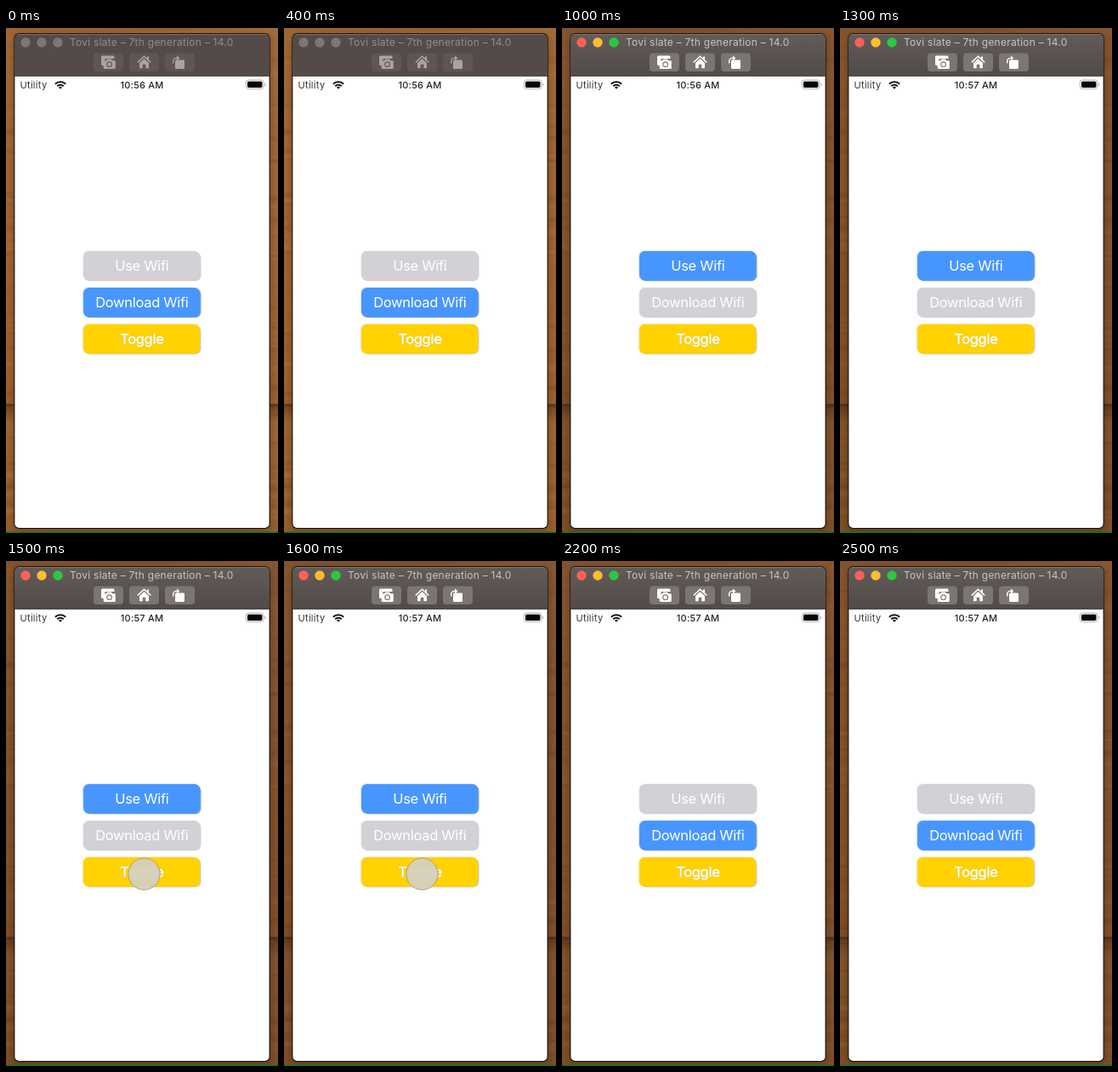
Recreate the animation shown at these times as an HTML page. Size 320 px wide and 593 px high, loop 2600 ms.

```html
<!DOCTYPE html>
<html lang="en">
<head>
<meta charset="utf-8">
<title>Toggle demo</title>
<style>
html, body { margin: 0; width: 100%; height: 100%; overflow: hidden; background: #805433; }
svg { display: block; width: 100%; height: 100%; }
text { font-family: Inter, "Liberation Sans", sans-serif; }
.label { font-size: 16.5px; letter-spacing: -0.3px; fill: #fff; text-anchor: middle; paint-order: stroke; }
.status { font-size: 11px; fill: #333; }
</style>
</head>
<body>
<svg viewBox="0 0 320 593" preserveAspectRatio="none">
  <defs>
    <linearGradient id="wood" x1="0" y1="0" x2="0" y2="1">
      <stop offset="0" stop-color="#a86c3a"/>
      <stop offset=".3" stop-color="#a96a36"/>
      <stop offset=".72" stop-color="#a4642f"/>
      <stop offset=".77" stop-color="#a66934"/>
      <stop offset="1" stop-color="#9d612f"/>
    </linearGradient>
    <linearGradient id="seam" x1="0" y1="0" x2="0" y2="1">
      <stop offset="0" stop-color="#3d2210" stop-opacity=".75"/>
      <stop offset=".2" stop-color="#4a2a14" stop-opacity=".4"/>
      <stop offset="1" stop-color="#4a2a14" stop-opacity="0"/>
    </linearGradient>
    <linearGradient id="bar" x1="0" y1="0" x2="0" y2="1">
      <stop offset="0" stop-color="#625c59"/>
      <stop offset="1" stop-color="#514a48"/>
    </linearGradient>
    <filter id="blur" x="-20%" y="-20%" width="140%" height="140%"><feGaussianBlur stdDeviation="5"/></filter>
  </defs>

  <rect width="320" height="593" fill="url(#wood)"/>
  <g id="grain" fill="none"/>
  <rect y="441.5" width="320" height="22" fill="url(#seam)"/>
  <rect id="shade" width="320" height="593" fill="#2a1c16"/>
  <rect x="9" y="10" width="302" height="580" rx="6" filter="url(#blur)" opacity=".3"/>
  <rect y="591.3" width="320" height="1.7" fill="#1a7512"/>

  <rect x="9.3" y="6" width="301.4" height="582" rx="6" fill="#17120f"/>
  <path d="M10 57V12a5 5 0 0 1 5-5H305a5 5 0 0 1 5 5V57Z" id="titlebar"/>
  <path d="M14 7.5H306" stroke="#8a817c" stroke-width=".8"/>
  <path d="M10.4 57H309.6V582a5 5 0 0 1-5 5H15.4a5 5 0 0 1-5-5Z" fill="#fff"/>
  <g id="lights">
    <circle cx="23" cy="17" r="5.7"/>
    <circle cx="42" cy="17" r="5.7"/>
    <circle cx="61" cy="17" r="5.7"/>
  </g>
  <text id="title" x="75" y="21.3" font-size="12" letter-spacing=".25">Tovi slate – 7th generation – 14.0</text>

  <g id="tools">
    <rect x="103" y="29.5" width="35" height="21.5" rx="4"/>
    <rect x="145" y="29.5" width="35" height="21.5" rx="4"/>
    <rect x="187" y="29.5" width="35" height="21.5" rx="4"/>
  </g>
  <g id="icons">
    <path d="M112 34a1.5 1.5 0 0 1 1.5-1.5H126a1.5 1.5 0 0 1 1.5 1.5V36H117.5L115.5 38V44H113.5a1.5 1.5 0 0 1-1.5-1.5Z"/>
    <path fill-rule="evenodd" d="M114.7 39.5a1.3 1.3 0 0 1 1.3-1.3H118l1.4-1.8h4.4l1.4 1.8h2.3a1.3 1.3 0 0 1 1.3 1.3V46.7a1.3 1.3 0 0 1-1.3 1.3H116a1.3 1.3 0 0 1-1.3-1.3ZM118.2 42.7a3.4 3.4 0 1 0 6.8 0a3.4 3.4 0 1 0-6.8 0ZM119.3 42.7a2.3 2.3 0 1 1 4.6 0a2.3 2.3 0 1 1-4.6 0Z"/>
    <path d="M162.5 32.2 154.3 39.8 155.3 40.9 162.5 34.3 169.7 40.9 170.7 39.8 168 37.2V33.5H166V35.4Z"/>
    <path d="M157 41 162.5 35.9 168 41V47.2H164.3V42.7H160.7V47.2H157Z"/>
    <rect x="199" y="37.5" width="11" height="10.5" rx="1.3"/>
    <path d="M196 41.5V39a4.2 4.2 0 0 1 4.2-4.2H201V32.2L204.4 35.4 201 38.5V36.1h-.6a3 3 0 0 0-3 3V41.5Z"/>
  </g>

  <text class="status" x="16.5" y="70.5" letter-spacing=".3">Utility</text>
  <g fill="none" stroke="#161616" stroke-width="2">
    <path d="M57.8 65.8A9 9 0 0 1 70.2 65.8"/>
    <path d="M60.2 68.3A5.4 5.4 0 0 1 67.8 68.3"/>
  </g>
  <path d="M64 71.8 61.9 69.7A3 3 0 0 1 66.1 69.7Z" fill="#161616"/>
  <text id="clock" class="status" x="160" y="70.5" text-anchor="middle" font-weight="500" letter-spacing=".2" style="fill:#222"></text>
  <rect x="282.3" y="61" width="20.8" height="10.6" rx="3" fill="#eee" stroke="#bbb"/>
  <rect x="284" y="62.7" width="17.4" height="7.2" rx="1.6" fill="#050505"/>
  <path d="M304.3 64.4a2 2 0 0 1 0 3.8Z" fill="#bbb"/>

  <g id="buttons"></g>
  <circle id="touch" cx="162.5" cy="367.5" r="18.6" fill="#d5d0c0" fill-opacity=".93" stroke="#aaa07d" stroke-width="1"/>
</svg>
<script>
const LOOP = 2600, ACTIVE_AT = 1000, MINUTE_AT = 1200;
const PRESS_AT = 1400, RELEASE_AT = 1700;
const GRAY = '#d3d1d5', BLUE = '#4796fe', YELLOW = '#ffd200';
const $ = id => document.getElementById(id);

function add(parent, tag, attrs, text) {
  const el = document.createElementNS('http://www.w3.org/2000/svg', tag);
  for (const key in attrs) el.setAttribute(key, attrs[key]);
  if (text) el.textContent = text;
  parent.appendChild(el);
  return el;
}

let seed = 7;
const random = () => (seed = seed * 16807 % 2147483647) / 2147483647;

// Wood grain: broad, faint, slightly tilted streaks
for (let i = 0; i < 60; i++) {
  const y = random() * 593;
  add($('grain'), 'path', {
    d: `M0 ${y}Q160 ${y + random() * 10 - 5} 320 ${y + random() * 24 - 12}`,
    stroke: random() < 0.55 ? '#713e18' : '#cb8a50',
    'stroke-width': 1 + random() * 6,
    opacity: 0.06 + random() * 0.12
  });
}

function button(y, label) {
  const g = add($('buttons'), 'g', {});
  const glow = add(g, 'rect', { x: 89.6, y: y - 1, width: 138, height: 35.5, rx: 7 });
  const edge = add(g, 'rect', { x: 92, y: y + 1, width: 137.5, height: 34.3, rx: 7 });
  const face = add(g, 'rect', { x: 91, y, width: 137.3, height: 34.4, rx: 6.5 });
  const text = add(g, 'text', { class: 'label', x: 159.8, y: y + 23.4 }, label);
  return (color, halo, rim, fringe) => {
    face.setAttribute('fill', color);
    glow.setAttribute('fill', halo);
    edge.setAttribute('fill', rim);
    text.setAttribute('stroke', fringe);
  };
}

const paintUse = button(262, 'Use Wifi');
const paintDownload = button(305, 'Download Wifi');
button(348, 'Toggle')(YELLOW, '#f6ecc0', '#cfccca', '#e6d99a');

function paint(set, on) {
  if (on) set(BLUE, '#d9eaf6', '#8aa5c8', 'none');
  else set(GRAY, '#f5f4f6', GRAY, 'none');
}

function render(t) {
  const active = t >= ACTIVE_AT;
  const useWifi = active && t < RELEASE_AT;
  paint(paintUse, useWifi);
  paint(paintDownload, !useWifi);

  $('shade').setAttribute('opacity', active ? 0.27 : 0.04);
  $('titlebar').setAttribute('fill', active ? 'url(#bar)' : '#544a48');
  $('title').setAttribute('fill', active ? '#c9c4c2' : '#958d8a');
  $('tools').setAttribute('fill', active ? '#7b7573' : '#5f5654');
  $('icons').setAttribute('fill', active ? '#fff' : '#aaa3a0');
  const colors = active ? ['#fe6058', '#febc30', '#2bc840'] : ['#7f7673', '#7f7673', '#7f7673'];
  [...$('lights').children].forEach((dot, i) => dot.setAttribute('fill', colors[i]));

  $('clock').textContent = t < MINUTE_AT ? '10:56 AM' : '10:57 AM';
  $('touch').setAttribute('visibility', t >= PRESS_AT && t < RELEASE_AT ? 'visible' : 'hidden');
}

const start = performance.now();
function tick() {
  render((performance.now() - start) % LOOP);
  requestAnimationFrame(tick);
}
tick();
</script>
</body>
</html>
```
